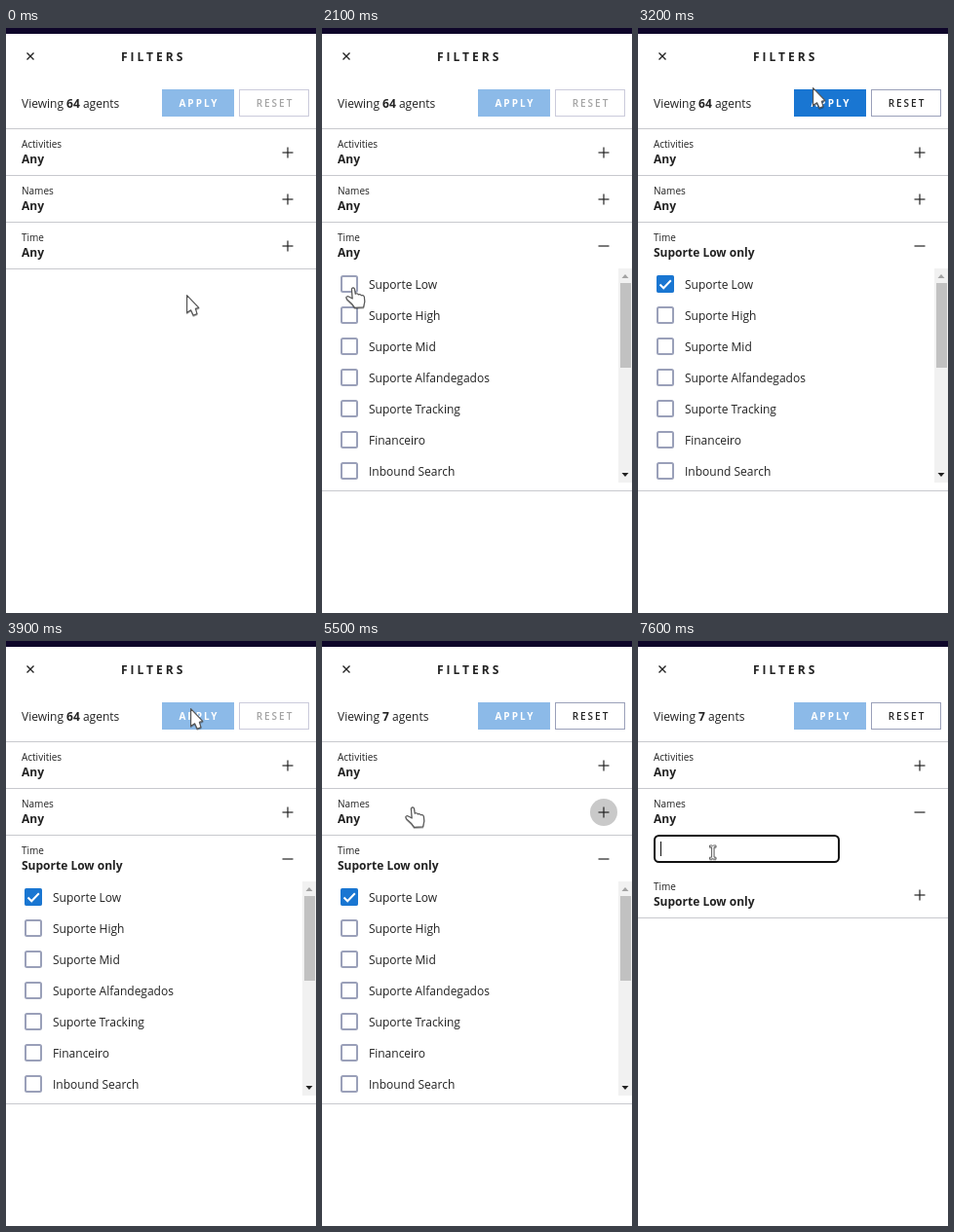
An HTML page for the animation above (8000 ms loop, 318 by 601 pixels).

```html
<!DOCTYPE html>
<html lang="en">
<head>
<meta charset="utf-8">
<title>Filters</title>
<style>
  html, body { margin: 0; width: 100%; height: 100%; overflow: hidden; background: #fff; }
  svg { display: block; font: 12px "Open Sans", sans-serif; fill: #222; }
  .b { font-weight: 700; }
  .s { font-size: 10px; }
  .btn { font-size: 10px; font-weight: 700; letter-spacing: 2px; text-anchor: middle; }
  .icon { fill: none; stroke: #222; stroke-width: 1.2; }
  .line { fill: none; stroke: #c8c9ce; }
  .box { fill: #fff; stroke: #9aa0b9; stroke-width: 2; }
  .halo { fill: #c9c9c9; }
  .cursor { fill: #fff; stroke: #555; stroke-width: 1.2; stroke-linejoin: round;
            filter: drop-shadow(.5px 1px .6px rgba(0, 0, 0, .3)); }
</style>
</head>
<body>
<svg width="318" height="601" viewBox="0 0 318 601">
  <rect width="318" height="6" fill="#0e0529"/>
  <path class="icon" d="M21.5 25.5l7 7m0-7l-7 7" style="stroke-width:1.4"/>
  <text class="b" x="118" y="34" style="letter-spacing:3px">FILTERS</text>
  <text x="16" y="82">Viewing <tspan class="b" id="count">64</tspan> agents</text>
  <rect id="apply" x="160" y="63" width="74" height="28"/>
  <text class="btn" x="198" y="81" style="fill:#fff">APPLY</text>
  <rect id="reset" x="239.5" y="63.5" width="71" height="27" fill="#fff"/>
  <text class="btn" id="resetText" x="276" y="81" style="font-weight:600">RESET</text>
  <path class="line" d="M0 103.5H318"/>
  <g id="rows"></g>
  <g id="list">
    <g id="items"></g>
    <g id="tick">
      <rect x="19" y="254" width="18" height="18" rx="2" fill="#1976d2"/>
      <path d="M22.5 263.5l3.7 3.7 7.6-8" fill="none" stroke="#fff" stroke-width="2"/>
    </g>
    <rect x="304" y="247" width="15" height="220" fill="#f1f1f1"/>
    <rect x="306" y="262" width="11" height="87" fill="#c1c1c1"/>
    <path d="M307.5 257h7l-3.5-4z" fill="#a3a3a3"/>
    <path d="M307.5 457h7l-3.5 4z" fill="#222"/>
    <path class="line" d="M0 475.5H318"/>
  </g>
  <g id="search">
    <rect class="box" id="input" x="17" y="200" width="189" height="27" rx="4.5"/>
    <path id="caret" d="M23.5 206v15" stroke="#111"/>
  </g>
  <g id="pointer">
    <path class="cursor" id="arrow" d="M-.4-.4V17.6L3.6 14.8 6.2 20.2 10 18.6 8.4 13.4 11.8 12.4Z"/>
    <path class="cursor" id="hand" d="M-1.6 1Q0-1.2 1.5 1L2.2 6.2Q4.2 5 5.3 6.9 7.3 5.9 8.4 7.8 10.6 7 11.4 9.4
      L11.8 14Q11.2 17 10.6 19.8L1.6 20.4Q-.6 16.6-4 14-7.2 11.6-7.2 9.8-6.6 8-4 9.2L-.8 11Z"/>
    <path class="cursor" id="beam" d="M-3.5-7H-1L-.2-6.4.6-7H3V-5.2H1V5.2H3V7H.6L-.2 6.4-1 7H-3.5V5.2H-1.4V-5.2H-3.5Z"
      style="stroke-width:.9"/>
  </g>
</svg>
<script>
const $ = id => document.getElementById(id);
const show = (el, on) => el.setAttribute('visibility', on ? 'visible' : 'hidden');

const LOOP = 8000, STEP = 100;
const names = ['Low', 'High', 'Mid', 'Alfandegados', 'Tracking'].map(n => 'Suporte ' + n)
  .concat('Financeiro', 'Inbound Search');

$('items').innerHTML = names.map((name, i) => `
  <rect class="box" x="20" y="${255 + 32 * i}" width="16" height="16" rx="1.5"/>
  <text x="48" y="${268 + 32 * i}">${name}</text>`).join('');

$('rows').innerHTML = ['Activities', 'Names', 'Time'].map(name => `
  <g>
    <circle class="halo" cx="289" cy="24" r="14"/>
    <text class="s" x="16" y="19">${name}</text>
    <text class="b" x="16" y="35">Any</text>
    <path class="icon" d="M283.5 24h11"/>
    <path class="icon" d="M289 18.5v11"/>
    <path class="line" d="M0 47.5H318"/>
  </g>`).join('');
const rows = [...$('rows').children].map(g => {
  const [halo, , value, , plus, line] = g.children;
  return { g, halo, value, plus, line };
});

// time, x, y of the pointer's hot spot
const path = [
  [0, 186, 275], [200, 196, 226], [1000, 196, 226], [1300, 118, 422], [1400, 118, 422],
  [2100, 32, 267], [2500, 32, 267], [2700, 85, 354], [3200, 180, 62], [3500, 190, 70],
  [3900, 190, 70], [4400, 84, 250], [5100, 84, 250], [5500, 93, 171], [6100, 93, 171],
  [6400, 38, 355], [6500, 38, 355], [6600, 58, 296], [7000, 77, 217], [LOOP, 77, 217]
];

function pointerAt(t) {
  const i = path.findIndex(k => k[0] > t);
  const [t0, x0, y0] = path[i - 1], [t1, x1, y1] = path[i];
  const p = (t - t0) / (t1 - t0), e = p * p * (3 - 2 * p);
  return [x0 + (x1 - x0) * e, y0 + (y1 - y0) * e];
}

function draw(t) {
  const open = t < 1000 ? -1 : t < 6100 ? 2 : 1;
  const checked = t >= 2500, focused = t >= 7600;
  const canApply = checked && t < 3900;
  const canReset = canApply || t >= 4700;
  const [x, y] = pointerAt(t);

  let overRow = false;
  rows.forEach((row, i) => {
    const top = 104 + 48 * i + (open === 1 && i === 2 ? 37 : 0) - 4;
    const rowTop = top + 4;
    const over = y >= rowTop && y < rowTop + 47;
    overRow = overRow || over;
    row.g.setAttribute('transform', `translate(0 ${rowTop})`);
    show(row.halo, over);
    show(row.plus, i !== open);
    show(row.line, i !== open);
  });
  rows[2].value.textContent = checked ? 'Suporte Low only' : 'Any';

  show($('list'), open === 2);
  show($('tick'), open === 2 && checked);
  show($('search'), open === 1);
  show($('caret'), focused);
  $('input').style.stroke = focused ? '#111' : '';
  $('count').textContent = t < 4700 ? '64' : '7';
  $('apply').style.fill = canApply ? '#1976d2' : '#8cbae8';
  $('reset').style.stroke = canReset ? '#9aa0b9' : '#cbcbdb';
  $('resetText').style.fill = canReset ? '#222' : '#a3a3a3';

  const overInput = open === 1 && y > 199 && y < 228;
  const overItem = open === 2 && y > 247 && y < 467 && x < 110;
  const overApply = canApply && y > 63 && y < 91 && x > 160 && x < 234;
  const kind = overInput ? 'beam' : overRow || overItem || overApply ? 'hand' : 'arrow';
  for (const id of ['arrow', 'hand', 'beam']) show($(id), id === kind);
  $('pointer').setAttribute('transform', `translate(${Math.round(x)} ${Math.round(y)})`);
}

const start = performance.now();
function tick(now) {
  const t = Math.max(0, now - start) % LOOP;
  draw(Math.floor(t / STEP) * STEP);
  requestAnimationFrame(tick);
}
draw(0);
requestAnimationFrame(tick);
</script>
</body>
</html>
```
